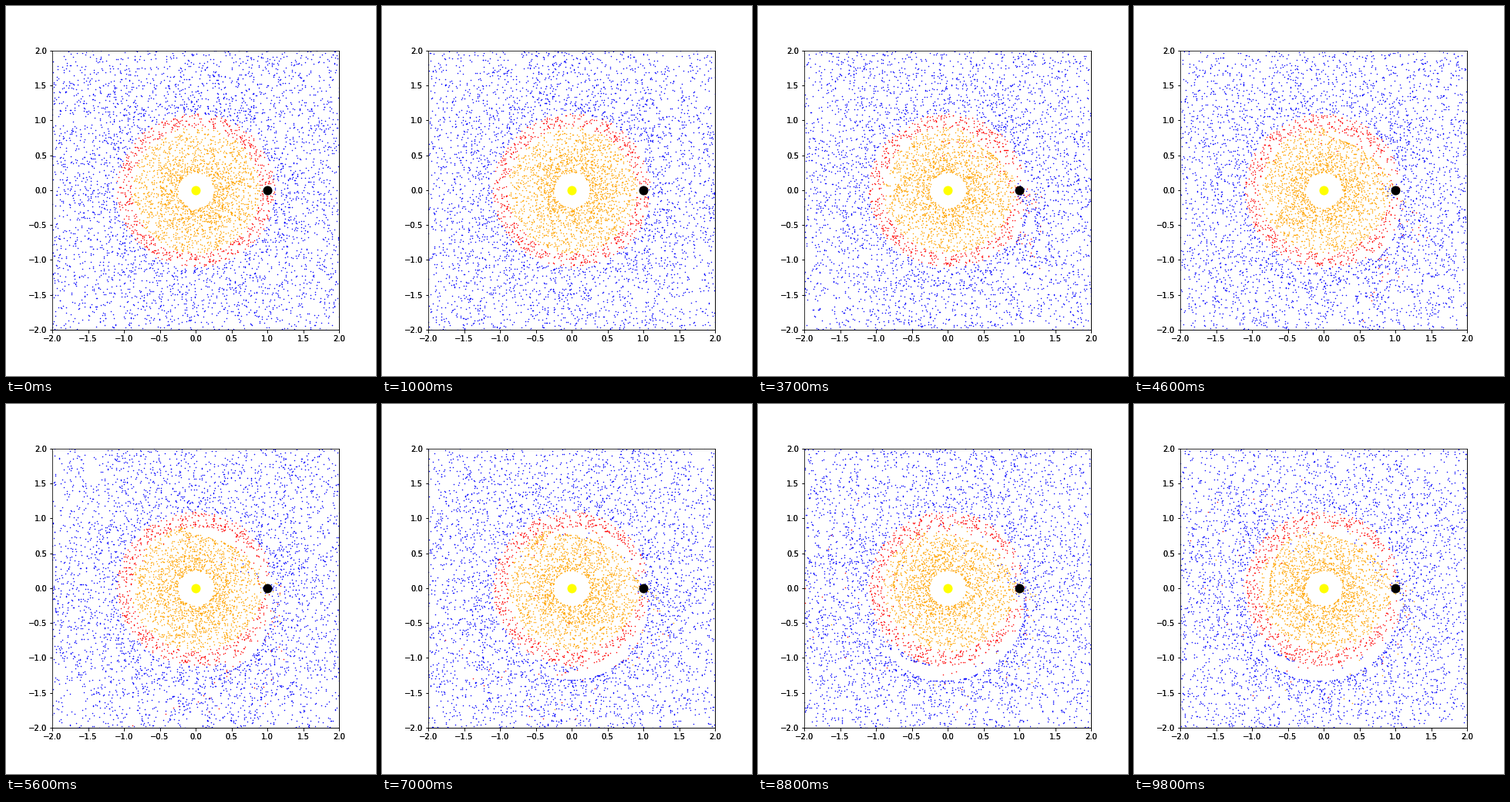
Write a matplotlib script that moves like this. It is 480 px wide and 480 px high and loops after 9900 ms.

```python
import numpy as np
import matplotlib.pyplot as plt
from matplotlib.animation import FuncAnimation

SIZE, DPI = 480, 72
FRAMES, INTERVAL = 99, 100
COUNT = 8000
R_MIN, R_MAX = 0.25, 3.0
MASS = 0.001            # planet mass in units of the star
FRAME_TIME = 0.1        # planet's period is 2 pi
SUBSTEPS = 20

plt.rcParams["font.family"] = "DejaVu Sans"
plt.rcParams["font.size"] = 10


def pull(pos, t):
    """Acceleration from the star at the origin and the orbiting planet."""
    gap = pos - np.exp(1j * t)
    star = pos / np.abs(pos) ** 3
    planet = MASS * gap / (np.abs(gap) ** 2 + 1e-5) ** 1.5
    return -star - planet


def simulate(pos):
    """Leapfrog from circular orbits; returns positions as seen by the planet."""
    vel = 1j * pos / np.abs(pos) ** 1.5
    dt = FRAME_TIME / SUBSTEPS
    t = 0.0
    acc = pull(pos, t)
    views = []
    for _ in range(FRAMES):
        views.append(pos * np.exp(-1j * t))
        for _ in range(SUBSTEPS):
            vel = vel + 0.5 * dt * acc
            pos = pos + dt * vel
            t += dt
            acc = pull(pos, t)
            vel = vel + 0.5 * dt * acc
    return views


rng = np.random.default_rng(7)
radius = rng.uniform(R_MIN, R_MAX, COUNT)
angle = rng.uniform(0, 2 * np.pi, COUNT)
views = simulate(radius * np.exp(1j * angle))

fig = plt.figure(figsize=(SIZE / DPI, SIZE / DPI), dpi=DPI, facecolor="white")


def add_axes():
    ax = fig.add_axes([0.125, 0.125, 0.775, 0.755], label=str(len(fig.axes)))
    ax.set(xlim=(-2, 2), ylim=(-2, 2))
    ticks = np.arange(-2, 2.1, 0.5)
    ax.set_xticks(ticks)
    ax.set_yticks(ticks)
    return ax


# Two stacked axes give the heavier tick labels.
add_axes()
ax = add_axes()

bands = [
    ("orange", radius < 0.9),
    ("red", (radius >= 0.9) & (radius <= 1.1)),
    ("blue", radius > 1.1),
]
dots = [
    (ax.plot([], [], "o", color=color, ms=1, mew=0.5)[0], mask)
    for color, mask in bands
]
for x, color in ((0, "yellow"), (1, "black")):
    ax.plot([x], [0], "o", color=color, ms=12, mew=0, zorder=4)


def draw(i):
    for line, mask in dots:
        z = views[i][mask]
        line.set_data(z.real, z.imag)
    return [line for line, _ in dots]


anim = FuncAnimation(fig, draw, frames=FRAMES, interval=INTERVAL,
                     init_func=lambda: draw(0), repeat=True, repeat_delay=0)
plt.show()
```
